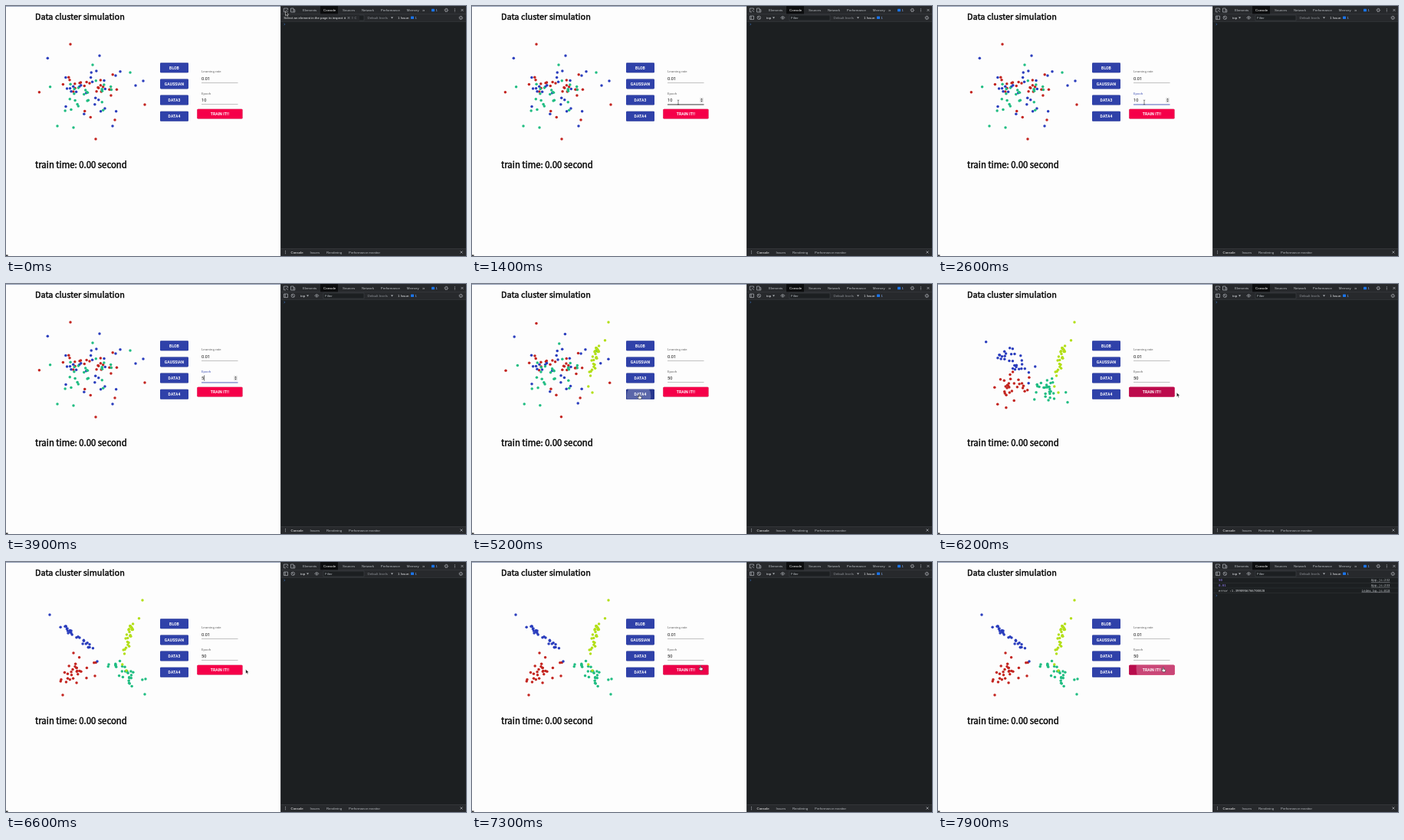
Animation of 600 by 327 pixels, one loop 8000 ms. Source, as an HTML page:

```html
<!DOCTYPE html>
<html lang="en">
<head>
<meta charset="utf-8">
<title>Data cluster simulation</title>
<style>
  html, body { margin: 0; width: 100%; height: 100%; overflow: hidden; background: #fdfdfd; }
  svg { display: block; }
  #stage { width: 100vw; height: 100vh; }
  text { white-space: pre; }
  .ui { font-family: Roboto, sans-serif; letter-spacing: .01em; }
  .btn { font-family: Roboto, sans-serif; font-weight: 700; letter-spacing: .02em; text-anchor: middle; }
  .head { font-family: "Noto Sans CJK KR", "Noto Sans CJK JP", "Noto Sans", sans-serif; font-weight: 500; stroke: #000; stroke-width: .4; }
  .dev { font-family: "Liberation Sans", Arial, sans-serif; }
  .mono { font-family: "DejaVu Sans Mono", monospace; }
  .link { text-anchor: end; text-decoration: underline; }
  .raised { filter: drop-shadow(0 .8px .6px rgba(0, 0, 0, .3)); }
  .icon { fill: none; stroke: #b0b4b9; stroke-width: .7; }
</style>
</head>
<body>
<svg id="stage" viewBox="0 0 600 327"></svg>
<script>
const LOOP = 8000;
const stage = document.getElementById('stage');
const $ = id => document.getElementById(id);

// ---- markup helpers
const GREY = '#b8bcc1';
const rect = (x, y, w, h, fill, more = '') =>
  `<rect x="${x}" y="${y}" width="${w}" height="${h}" fill="${fill}" ${more}/>`;
const text = (x, y, str, size, fill, cls, more = '') =>
  `<text x="${x}" y="${y}" font-size="${size}" fill="${fill}" class="${cls}" ${more}>${str}</text>`;
const dev = (x, y, str, fill = GREY, size = 4.4) => text(x, y, str, size, fill, 'dev');
const path = (d, more = 'class="icon"') => `<path d="${d}" ${more}/>`;
const down = (x, y) => path(`M${x} ${y}h3l-1.5 2z`, `fill="${GREY}"`);
const gear = (x, y) =>
  `<circle cx="${x}" cy="${y}" r="1.6" class="icon"/>` +
  `<circle cx="${x}" cy="${y}" r="2.3" class="icon" stroke-dasharray=".9 .9"/>`;
const dots = (x, y) => [-1.7, 0, 1.7].map(d => `<circle cx="${x}" cy="${y + d}" r=".5" fill="${GREY}"/>`).join('');
const cross = (x, y) => path(`M${x - 1.5} ${y - 1.5}l3 3m0 -3l-3 3`);
const badge = (x, y) => rect(x, y, 4, 3.6, '#1a73e8', 'rx=".6"') + dev(x + 5.5, y + 3.4, '1', '#8ab4f8');
// evenly spaced labels; the console tab is the active one
const tabs = (x, y, names) => dev(x, y, names.map((s, i) =>
  `<tspan dx="${i ? 8.8 : 0}" fill="${s === 'Console' ? '#fff' : GREY}">${s}</tspan>`).join(''));

// ---- buttons: each has a hover layer and a ripple clipped to its box
const buttons = ['BLOB', 'GAUSSIAN', 'DATA3', 'DATA4'].map((label, i) =>
  ({ label, x: 201, y: 74.2 + i * 21.2, w: 37, h: 13, color: '#2f41a9', dark: '#26368e' }));
buttons.push({ label: 'TRAIN IT!!', x: 249.3, y: 134.8, w: 59.2, h: 12.8, color: '#f50049', dark: '#b80c4c' });

const button = ({ label, x, y, w, h, color, dark }, i) =>
  rect(x, y, w, h, color, 'rx="1.3" class="raised"') +
  rect(x, y, w, h, dark, `rx="1.3" id="hover${i}"`) +
  `<svg x="${x}" y="${y}" width="${w}" height="${h}"><circle id="ripple${i}" fill="#fff" fill-opacity=".24"/></svg>` +
  text(x + w / 2, y + 8.4, label, 5, '#fff', 'btn');

// ---- scatter data: seeded normal clouds, plus a few outliers that set their extent
const COUNT = 30;
let seed = 11;
const rand = () => (seed = (seed * 16807) % 2147483647) / 2147483647;
const bell = () => (rand() + rand() + rand() - 1.5) * 2;

function cloud({ x, y, sx, sy, slope = 0 }, ...outliers) {
  const fill = Array.from({ length: COUNT - outliers.length }, () => {
    const dx = bell() * sx;
    return [x + dx, y + dx * slope + bell() * sy];
  });
  return [...outliers, ...fill];
}

const mixed = { x: 107, y: 108, sx: 22, sy: 15 };
const series = [
  { color: '#c3241f',
    from: cloud(mixed, [84, 50], [181, 129], [142, 149], [117, 174]),
    to: cloud({ x: 88, y: 143, sx: 12, sy: 8 }, [74, 174], [88, 119], [116, 149]) },
  { color: '#2a3dbd',
    from: cloud(mixed, [122, 65], [179, 98], [169, 104], [139, 157]),
    to: cloud({ x: 88, y: 94, sx: 14, sy: 2.5, slope: .8 }, [57, 69], [119, 130]) },
  { color: '#20bd82',
    from: cloud({ ...mixed, y: 118, sy: 12 }, [113, 77], [162, 87], [67, 157], [88, 159]),
    to: cloud({ x: 156, y: 146, sx: 9, sy: 6, slope: .6 }, [134, 134], [182, 153], [181, 173]) },
  { color: '#b3df18',
    to: cloud({ x: 162, y: 95, sx: 5, sy: 7, slope: -2.5 }, [178, 50], [157, 142]) }
];

const plot = series.map(({ color }, s) =>
  `<g id="series${s}" fill="${color}">${'<circle r="1.75"/>'.repeat(COUNT)}</g>`).join('');

// ---- page
const input = (y, label, value, id) =>
  text(255, y, label, 4.3, '#606060', 'ui', `id="${id}Label"`) +
  text(255, y + 9.8, value, 5.7, '#111', 'ui', `id="${id}Value"`) +
  rect(255, y + 13, 47.5, .5, '#858585', `id="${id}Line"`);

const page =
  rect(0, 0, 358, .8, '#7f8da8') + rect(0, 325.5, 2.5, 1.5, '#333') +
  text(38, 18, 'Data cluster simulation', 10.9, '#000', 'head') +
  text(38, 212.3, 'train time: 0.00 second', 11.35, '#000', 'head') +
  plot + buttons.map(button).join('') +
  input(87.2, 'Learning rate', '0.01', 'rate') + input(115.5, 'Epoch', '', 'epoch') +
  rect(0, 119.3, .6, 7.4, '#222', 'id="caret"') +
  `<g id="spinner">${rect(297, 119.8, 5, 6.6, '#e6e6e6', 'rx=".8"')}` +
  path('M298.2 122.4l1.3 -1.6l1.3 1.6zM298.2 123.8l1.3 1.6l1.3 -1.6z', 'fill="#444"') + '</g>';

// ---- developer tools panel
const BAR = '#27292c', RULE = '#45484c';
const logs = [['50', 'App.js:232'], ['0.01', 'App.js:233'], ['error :1.3990956766700028', 'index_bg.js:818']];

const frameBars =
  rect(358, 0, 242, 327, '#1c1f21') + rect(358, 0, 242, 20.3, BAR) + rect(358, 317, 242, 10, BAR) +
  rect(358, 0, .6, 327, RULE) + [10.3, 20.3, 317].map(y => rect(358, y, 242, .4, RULE)).join('');

const topBar =
  path('M365 7.8h-2.6v-4.8h5v2.4M365 5.2l2.8 2.8') + path('M371.5 3h3.5v5h-3.5zM375 4.8h1.8v3.2h-1.8') +
  rect(410, 0, 23, 10.3, '#0c0d0e') +
  tabs(387, 7, ['Elements', 'Console', 'Sources', 'Network', 'Performance', 'Memory']) + dev(543, 7, '»', GREY, 6) +
  badge(555, 3.7) + gear(574.3, 5.4) + dots(585.3, 5.4) + cross(595, 5.4);

const filterBar =
  path('M362.5 13h5v4.6h-5zM364.2 13v4.6') +
  '<circle cx="374.3" cy="15.3" r="2.2" class="icon"/>' + path('M372.8 13.8l3 3') +
  dev(384, 17, 'top', '#e8eaed') + down(392, 14.5) +
  path('M402.8 15.3q2.5 -3.6 5 0q-2.5 3.6 -5 0z') + `<circle cx="405.3" cy="15.3" r=".8" fill="${GREY}"/>` +
  rect(414, 12, 53, 7, '#1c1f21', `stroke="${RULE}" stroke-width=".5"`) +
  dev(416, 17, 'Filter') + dev(471.5, 17, 'Default levels', '#8d9196') + down(502, 14.5) +
  dev(511, 17, '1 Issue:', '#e8eaed') + badge(528, 13.5) + gear(593.3, 15.4);

const tip = '<g id="tip">' + rect(361, 11, 100, 9.2, BAR) +
  dev(362.3, 17, 'Select an element in the page to inspect it', '#f1f3f4', 4.35) +
  dev(445, 17, '⌘ ⇧ C', '#8d9196', 4) + '</g>';

const output =
  path('M0 0l1.3 1.3l-1.3 1.3', 'id="prompt" fill="none" stroke="#3f7fd8" stroke-width=".6"') +
  '<g id="logs">' + logs.map(([msg, link], i) => {
    const y = 25.2 + i * 6.7;
    return text(366, y, msg, 4, isNaN(msg) ? '#d5d7da' : '#9980ff', 'mono') +
      text(589.5, y, link, 4.1, GREY, 'mono link') + rect(359, y + 1.9, 241, .4, '#3a3d41');
  }).join('') + '</g>';

const drawer = dots(364.5, 322) +
  tabs(371.5, 323.6, ['Console', 'Issues', 'Rendering', 'Performance monitor']) + cross(594, 322);

// ---- pointers, each with its hotspot at 0,0
const pointers =
  '<g id="pointer">' +
  path('M0 0v5.6l1.3 -1.2l.9 2l1 -.4l-.9 -2h1.8z', 'id="arrow" fill="#111" stroke="#fff" stroke-width=".5"') +
  path('M-.7 .4q.7 -.8 1.2 0v2.2l2 .5q.8 .3 .6 1.2l-.5 2h-3l-1.9 -2.4q0 -.8 .8 -.6l.8 .6z',
    'id="hand" fill="#fff" stroke="#222" stroke-width=".6"') +
  path('M-1.2 -3q1.2 0 1.2 .8q0 -.8 1.2 -.8M0 -2.2v4.4M-1.2 3q1.2 0 1.2 -.8q0 .8 1.2 .8',
    'id="beam" fill="none" stroke="#333" stroke-width=".6"') + '</g>';

stage.innerHTML = page + frameBars + topBar + filterBar + tip + output + drawer + pointers;

// ---- timeline
const FOCUS = 2080, TYPING = 2780, RESUME = 4280, BLUR = 5080, MORPH = 5180, LOGGED = 7880;
const route = [[580, 364.5, 7], [1400, 269, 126], [RESUME, 269, 126], [5050, 217.5, 144],
  [5700, 220, 145], [6200, 311.3, 142], [7250, 315, 138], [7300, 298, 135.5], [7800, 293.7, 137.5]];
const edits = [[0, '10'], [FOCUS, '10'], [TYPING, '1'], [3080, ''], [3880, '5'], [3980, '50']];
const presses = [{ i: 3, t: 5050, speed: .105 }, { i: 4, t: 7640, speed: .14 }];

const clamp = v => Math.min(1, Math.max(0, v));
const mix = (a, b, u) => a + (b - a) * u;
const inside = ([px, py], { x, y, w, h }) => px >= x && px <= x + w && py >= y && py <= y + h;
const field = { x: 255, y: 117, w: 47.5, h: 12 };
const show = (id, on) => $(id).setAttribute('visibility', on ? 'visible' : 'hidden');
const set = (el, attrs) => { for (const k in attrs) el.setAttribute(k, attrs[k]); };

function pointerAt(t) {
  const next = route.findIndex(p => p[0] >= t);
  const k = next < 0 ? route.length - 1 : Math.max(1, next);
  const [t0, x0, y0] = route[k - 1], [t1, x1, y1] = route[k];
  const u = clamp((t - t0) / (t1 - t0));
  return [mix(x0, x1, u), mix(y0, y1, u)];
}

function drawPlot(t) {
  const p = clamp((t - MORPH) / 1400);
  series.forEach(({ from, to }, s) => {
    show('series' + s, from || t >= MORPH);
    [...$('series' + s).children].forEach((dot, i) => {
      const [x1, y1] = to[i];
      // counting back sends each starting outlier into the middle of its cluster
      const [x0, y0] = from ? from[COUNT - 1 - i] : to[i];
      set(dot, { cx: mix(x0, x1, p), cy: mix(y0, y1, p) });
    });
  });
}

function drawButtons(t) {
  // the hover colour follows the pointer over a quarter of a second
  buttons.forEach((b, i) => {
    let hits = 0;
    for (let k = 0; k < 25; k++) hits += inside(pointerAt(t - k * 10), b);
    set($('hover' + i), { opacity: hits / 25 });
  });
  for (const { i, t: start, speed } of presses) {
    const age = t - start, b = buttons[i], [x, y] = pointerAt(start);
    set($('ripple' + i), {
      cx: x - b.x, cy: y + 2 - b.y,
      r: Math.min(Math.max(0, age * speed), 50),
      opacity: clamp((900 - age) / 500)
    });
  }
}

function drawField(t, pos) {
  const focused = t >= FOCUS && t < BLUR;
  const hovered = inside(pos, field);
  const [since, value] = edits.filter(e => e[0] <= t).pop();
  $('epochValue').textContent = value;
  set($('epochLabel'), { fill: focused ? '#3f51b5' : '#606060' });
  set($('epochLine'), { fill: focused ? '#3f51b5' : hovered ? '#222' : '#858585', height: focused || hovered ? .9 : .5 });
  set($('caret'), { x: 255.2 + value.length * 3.25 });
  show('caret', focused && (t - since) % 1000 < 500);
  show('spinner', focused || hovered);
}

function drawPointer(t, pos) {
  const hidden = t >= TYPING && t < RESUME;
  const kind = buttons.some(b => inside(pos, b)) ? 'hand' : inside(pos, field) ? 'beam' : 'arrow';
  set($('pointer'), { transform: `translate(${pos})` });
  for (const k of ['arrow', 'hand', 'beam']) show(k, !hidden && k === kind);
}

function frame(now) {
  const t = now % LOOP, pos = pointerAt(t);
  drawPlot(t);
  drawButtons(t);
  drawField(t, pos);
  drawPointer(t, pos);
  show('tip', t < 300);
  show('logs', t >= LOGGED);
  set($('prompt'), { transform: `translate(362.5 ${t >= LOGGED ? 42.6 : 22.6})` });
  requestAnimationFrame(frame);
}
requestAnimationFrame(frame);
</script>
</body>
</html>
```
